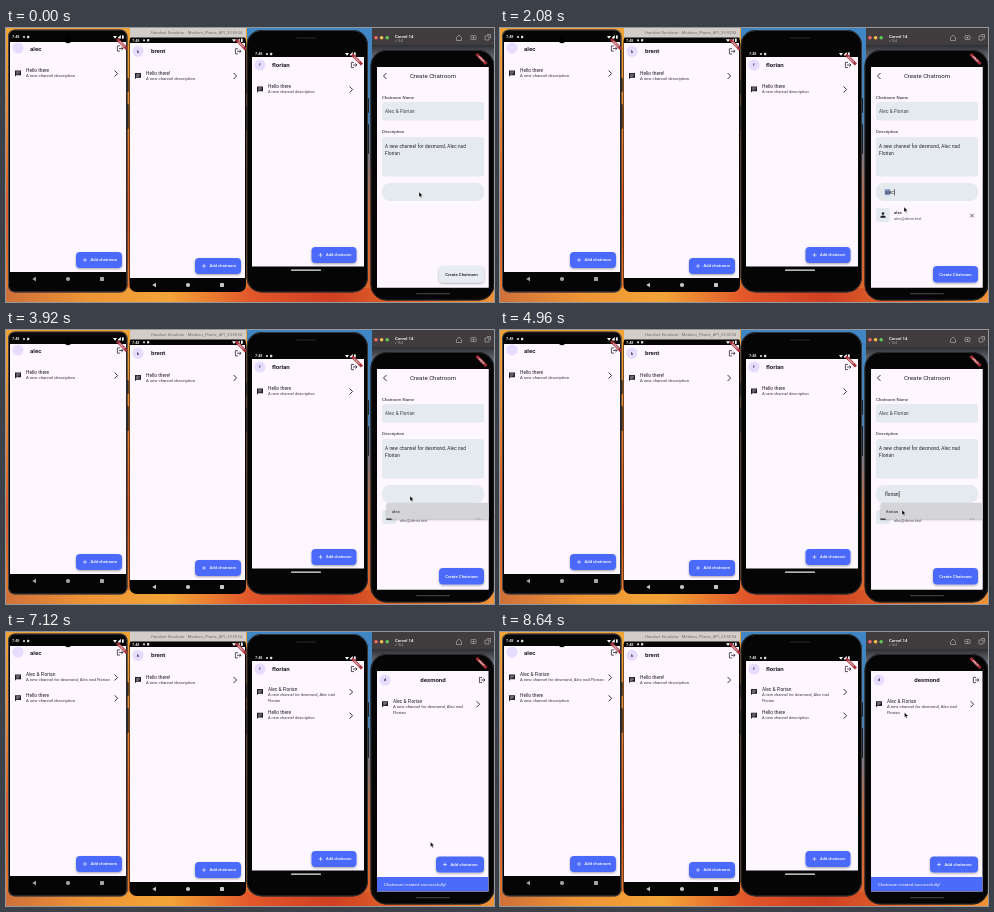
Recreate the animation shown at these times as an HTML page. Size 488x274 px, loop 8720 ms.

```html
<!DOCTYPE html>
<html lang="en">
<head>
<meta charset="utf-8">
<title>Chatroom demo</title>
<style>
html, body { margin: 0; width: 100%; height: 100%; overflow: hidden; background: #000; }
svg { display: block; width: 100vw; height: 100vh; }
text { font-family: Roboto, "Noto Sans", sans-serif; white-space: pre; }
</style>
</head>
<body>
<svg id="stage" viewBox="0 0 488 274" xmlns="http://www.w3.org/2000/svg"></svg>
<script>
const LOOP = 8720, STEP = 80;
const BLUE = '#4b6bfb', INK = '#1f1d24', PAPER = '#fef7ff', FIELD = '#e4eaed', BODY = '#050506';
const A = 'alec', B = 'brent', C = 'florian', D = 'desmond';
const ROOM = 'Alec & Florian';
const ABOUT = `A new channel for ${D}, Alec nad`;
const HELLO = 'A new channel description';

// Drawing helpers
const rect = (x, y, w, h, fill, r = 0, more = '') =>
  `<rect x="${x}" y="${y}" width="${w}" height="${h}" rx="${r}" fill="${fill}" ${more}/>`;
const dot = (x, y, r, fill, more = '') =>
  `<circle cx="${x}" cy="${y}" r="${r}" fill="${fill}" ${more}/>`;
const line = (d, color = INK, w = 0.8) =>
  `<path d="${d}" fill="none" stroke="${color}" stroke-width="${w}"/>`;
const text = (x, y, s, size, fill = INK, weight = 400, more = '') =>
  `<text x="${x}" y="${y + size * 0.35}" font-size="${size}" fill="${fill}" font-weight="${weight}" ${more}>${s.replace(/&/g, '&amp;')}</text>`;
const group = (id, body, more = '') => `<g id="${id}" ${more}>${body}</g>`;
const gradient = (id, colors, more = '') => `<linearGradient id="${id}" ${more}>` +
  colors.map((c, i) => `<stop offset="${i / (colors.length - 1)}" stop-color="${c}"/>`).join('') + '</linearGradient>';
const MID = 'text-anchor="middle"', DOWN = 'x2="0" y2="1"';

const shell = (x, y, w, h, r, edge) =>
  rect(x, y, w, h, BODY, r) +
  rect(x + 0.5, y + 0.5, w - 1, h - 1, 'none', r - 0.5, `stroke="${edge}" stroke-width=".7"`);
const chevron = (x, y) => line(`M${x - 1.4} ${y - 3}l3 3l-3 3`, INK, 0.9);
const logout = (x, y) =>
  line(`M${x} ${y - 2.6}h-2.6v5.2h2.6M${x - 1} ${y}h4M${x + 1.4} ${y - 1.6}l1.6 1.6l-1.6 1.6`, INK, 0.75);
const bubble = (x, y) =>
  `<path d="M${x - 3} ${y - 3}h6v4.7h-4.7l-1.3 1.5z" fill="${INK}"/>` +
  line(`M${x - 1.8} ${y - 1.7}h3.6M${x - 1.8} ${y - 0.6}h3.6M${x - 1.8} ${y + 0.5}h2.4`, PAPER, 0.4);
const fab = (x, y, w, h, size) =>
  rect(x, y, w, h, BLUE, 4, 'filter="url(#drop)"') +
  line(`M${x + 7} ${y + h / 2}h4M${x + 9} ${y + h / 2 - 2}v4`, '#fff', 0.6) +
  text(x + 14.5, y + h / 2, 'Add chatroom', size, '#fff', 500);
const banner = (x, y) =>
  `<g transform="translate(${x} ${y}) rotate(45)">` + rect(-7, -1.5, 14, 3, '#a8323c') +
  text(0, 0, 'DEBUG', 2.3, '#fff', 700, MID) + '</g>';
const header = (x, y, name, nameX, outX, more = '') =>
  dot(x, y, 5.6, '#e6dcff') + text(x, y, name[0], 3.6, '#241c44', 700, MID) +
  text(nameX, y, name, 6.1, INK, 700, more) + logout(outX, y);
function item(x, y, title, lines, endX, size = 4.2, gap = 6) {
  const iconY = y + 3;
  return bubble(x, iconY) + text(x + 8, y, title, 4.8, INK) +
    lines.map((s, i) => text(x + 8, y + 5.2 + i * gap, s, size, '#35323c')).join('') +
    chevron(endX, iconY);
}
const status = (x, y, right) =>
  text(x, y, '7:48', 3.8, '#fff', 500) + dot(x + 12, y, 1.1, '#ddd') + rect(x + 15, y - 1.2, 2.2, 2.4, '#ddd', 0.4) +
  `<path d="M${right - 9} ${y - 1}h4l-2 2.8zM${right - 4} ${y + 1.6}v-1l2.8-2.5v3.5z" fill="#fff"/>` +
  rect(right, y - 1.7, 1.7, 3.4, '#fff', 0.4);
const navBar = (mid, y, color) =>
  `<path d="M${mid - 32} ${y - 2.2}v4.4l-3.8-2.2z" fill="${color}"/>` + dot(mid, y, 2.1, color) +
  rect(mid + 32, y - 2, 4, 4, color, 0.4);

const defs = '<defs>' +
  gradient('warm', ['#f0a437', '#e98530', '#dd5a24', '#e57a2c'], DOWN) +
  gradient('cool', ['#3f86c6', '#4a82b4', '#c96a3c', '#e0632a'], DOWN) +
  gradient('floor', ['#d0703a', '#ee9435', '#f2a437', '#e2572a', '#cf3f22', '#e06c2c', '#ef9238']) +
  gradient('shade', ['#2e2f33', '#6d7078'], DOWN) +
  `<filter id="drop" x="-20%" y="-30%" width="140%" height="180%">
<feDropShadow dx="0" dy="1" stdDeviation="1.3" flood-color="#000" flood-opacity=".35"/></filter>
<clipPath id="glass"><path d="M371 39h111.500v220.500h-111.500z"/></clipPath></defs>`;

const wallpaper = () =>
  rect(0, 0, 488, 274, 'url(#warm)') + rect(241, 0, 247, 274, 'url(#cool)') +
  rect(0, 260, 488, 14, 'url(#floor)');

function phoneOne() {
  const hello = y => item(12, y, 'Hello there', [HELLO], 110);
  return rect(120, 50, 2.6, 14, '#161616', 1) + rect(120, 76, 2.6, 25, '#161616', 1) +
    shell(2, 1.5, 119.5, 263, 7, '#66666a') + rect(4, 14, 116, 230, PAPER) +
    status(6, 9, 116) + dot(62, 12, 3.2, '#000') +
    dot(12, 20, 5.6, '#e6dcff') + text(24, 20.5, A, 6.1, INK, 700) + logout(114, 20.5) + banner(116, 16) +
    group('oldOne', hello(42.5)) +
    group('newOne', item(12, 42.5, ROOM, [`${ABOUT} Florian`], 110) + hello(63.3)) +
    fab(70, 224, 46, 16, 4.2) + navBar(62, 251, '#a5a5a5');
}

function phoneTwo() {
  return rect(238, 52, 2.8, 14, '#161616', 1) + rect(238, 78, 2.8, 25, '#161616', 1) +
    rect(123.5, 6, 116.5, 258, BODY, 7) + rect(124, 0, 116, 9.5, '#d3cdc9') +
    text(145, 4.8, 'Handset Emulator - Medium_Phone_API_35:5554', 4.2, '#75706e') +
    rect(124, 15, 115, 235, PAPER) + status(126, 12.3, 235) +
    header(132, 23.3, B, 145, 232) + banner(235, 16.5) +
    item(132, 45, 'Hello there!', [HELLO], 229) +
    fab(189, 230, 46, 16, 4.2) + navBar(182, 257, '#c8c8c8');
}

function phoneThree() {
  const hello = y => item(254, y, 'Hello there', [HELLO], 345, 4);
  return rect(360, 70, 3, 15, '#202020', 1) + rect(360, 96, 3, 30, '#202020', 1) +
    shell(240.5, 2, 121.5, 262.5, 15, '#4b4b4e') + rect(290, 9.4, 20, 1.2, '#2b2b2d', 0.6) +
    rect(246, 29, 112, 209.5, PAPER) + status(249, 26, 348) +
    header(254, 37, C, 266, 348) + banner(351, 31.5) +
    group('oldThree', hello(58.5)) +
    group('newThree', item(254, 57, ROOM, [ABOUT, 'Florian'], 345, 4) + hello(80.7)) +
    fab(305.5, 219, 45, 16, 4) + rect(285, 241.5, 30, 1.3, '#eee', 0.6);
}

function personRow(id, y, name) {
  return group(id, rect(376, y, 14, 14, FIELD, 3) +
    dot(383, y + 5.5, 1.3, INK) + `<path d="M380.300 ${y + 9.7}q0-2.200 2.700-2.200t2.700 2.200z" fill="${INK}"/>` +
    text(394, y + 4, name, 4.3, INK, 500) + text(394, y + 10.2, `${name}@demo.test`, 3.8, '#4b4b52') +
    line(`M470.300 ${y + 5.8}l3.600 3.600M473.900 ${y + 5.8}l-3.600 3.600`, INK, 0.65));
}

function formPage() {
  const wide = 'letter-spacing=".12"';
  const create = (id, bg, ink) => group(id, rect(433, 238, 45, 16.5, bg, 4, 'filter="url(#drop)"') +
    text(455.5, 246.3, 'Create Chatroom', 4.3, ink, 500, MID));
  return group('form', rect(371, 39, 112, 221, PAPER) +
    line('M380.500 45l-3 3l3 3', INK, 0.9) + text(427, 48, 'Create Chatroom', 6.1, INK, 400, MID) +
    text(376, 69, 'Chatroom Name', 4.4) + rect(376, 74, 102, 18.5, FIELD, 3) +
    text(379, 83.7, ROOM, 4.6, '#3a3d42', 400, wide) +
    text(376, 103, 'Description', 4.4) + rect(376, 109, 102, 39.5, FIELD, 3) +
    text(379, 118, ABOUT, 4.6, INK, 400, wide) + text(379, 125, 'Florian', 4.6, INK, 400, wide) +
    rect(376, 155, 102, 18, FIELD, 8) + rect(384.7, 161, 5.5, 6.2, '#93a3cf', 0, 'id="mark"') +
    text(385, 164.2, '', 4.8, INK, 400, 'id="query"') + rect(395, 161, 0.6, 6.4, INK, 0, 'id="caret"') +
    personRow('rowOne', 180, A) + personRow('rowTwo', 198, C) +
    create('idle', '#e6ecef', INK) + create('ready', BLUE, '#fff') +
    group('menu', rect(381, 173, 102, 15.5, '#d5d4d7', 0, 'filter="url(#drop)"') +
      text(386, 181, '', 4.3, INK, 400, 'id="option"')));
}

function phoneFour() {
  const home = rect(371, 39, 112, 221, PAPER) + header(379, 48, D, 427, 476, MID) +
    item(379, 69.2, ROOM, [ABOUT, 'Florian'], 472, 4.2) +
    fab(430, 224.5, 48, 16, 4.3) +
    group('snack', rect(371, 245, 111.5, 14.5, BLUE) +
      text(378, 252.2, 'Chatroom created successfully!', 4.3, '#fff', 400, 'letter-spacing=".06"'));
  return rect(366, 17, 122, 14, 'url(#shade)') + rect(366, 0, 122, 17, '#413d3f') +
    ['#ee6a5f', '#f5bd4f', '#61c454'].map((c, i) => dot(370 + i * 5.6, 9.8, 1.8, c)).join('') +
    text(389, 8, 'Corvel 14', 4.3, '#eee', 700) + text(389, 12.6, 'v 16.4', 3, '#aaa') +
    line('M450.500 9.500l2.500-2.500l2.500 2.500v3h-5z', '#bbb', 0.6) +
    rect(465, 7.6, 5, 4, 'none', 0.6, 'stroke="#bbb" stroke-width=".6"') + dot(467.5, 9.6, 0.9, '#bbb') +
    line('M479 8h4v4h-4zM481 6.500h3.500v4', '#bbb', 0.6) +
    shell(364.5, 22, 124, 250.5, 16, '#39393b') +
    `<g clip-path="url(#glass)">${home}${formPage()}</g>` + banner(475.5, 31) +
    rect(410, 265, 34, 1.2, '#3c3c3e', 0.6);
}

document.getElementById('stage').innerHTML = defs + wallpaper() +
  phoneOne() + phoneTwo() + phoneThree() + phoneFour() +
  group('mouse', '<path d="M0 0v5l1.200-1.100l.8 1.900l.9-.4l-.8-1.800h1.600z" fill="#000" stroke="#fff" stroke-width=".35"/>');

const el = id => document.getElementById(id);
const show = (id, on) => el(id).setAttribute('visibility', on ? 'inherit' : 'hidden');

// [time, value]: each value holds until the next
const queries = [[0, ''], [800, A[0]], [1040, A.slice(0, 2)], [1920, A], [3440, ''],
  [4240, C.slice(0, 1)], [4400, C.slice(0, 2)], [4560, C.slice(0, 3)], [4800, C]];
const options = [[0, ''], [1120, A], [1920, ''], [3520, A], [4400, C], [5040, '']];
// [time, x, y]
const path = [[0, 413, 164], [1440, 413, 164], [1760, 404, 179], [2080, 404, 179], [2480, 404, 166],
  [4560, 404, 166], [4880, 402, 180], [5200, 402, 180], [5840, 458.5, 246],
  [6560, 458.5, 246], [7040, 424.5, 210], [7520, 424.5, 210], [8160, 404.5, 80.5], [LOOP, 404.5, 80.5]];

const held = (table, t) => table.filter(k => k[0] <= t).pop()[1];
const ease = p => p * p * (3 - 2 * p);
function mouseAt(t) {
  const i = path.findIndex(k => k[0] > t), [t0, x0, y0] = path[i - 1], [t1, x1, y1] = path[i];
  const p = ease((t - t0) / (t1 - t0));
  return [x0 + (x1 - x0) * p, y0 + (y1 - y0) * p];
}

function draw(t) {
  const query = held(queries, t), option = held(options, t);
  el('query').textContent = query;
  el('option').textContent = option;
  const width = query ? el('query').getComputedTextLength() : 0;
  el('caret').setAttribute('x', 385.3 + width);
  show('mark', t >= 1200 && t < 3440);
  show('caret', query && t < 5040);
  show('menu', option);
  show('rowOne', t >= 2000);
  show('rowTwo', t >= 5120);
  show('idle', t < 2000);
  show('ready', t >= 2000);

  const posted = t >= 6560;
  for (const n of ['One', 'Three']) {
    show('old' + n, !posted);
    show('new' + n, posted);
  }
  const slide = Math.min(1, Math.max(0, (t - 6480) / 320));
  el('form').setAttribute('transform', `translate(${112 * ease(slide)} 0)`);
  show('form', slide < 1);
  show('snack', t >= 6640);
  el('mouse').setAttribute('transform', `translate(${mouseAt(t)})`);
}

const start = performance.now();
function tick() {
  const t = (performance.now() - start) % LOOP;
  draw(Math.floor(t / STEP) * STEP);
  requestAnimationFrame(tick);
}
tick();
</script>
</body>
</html>
```
